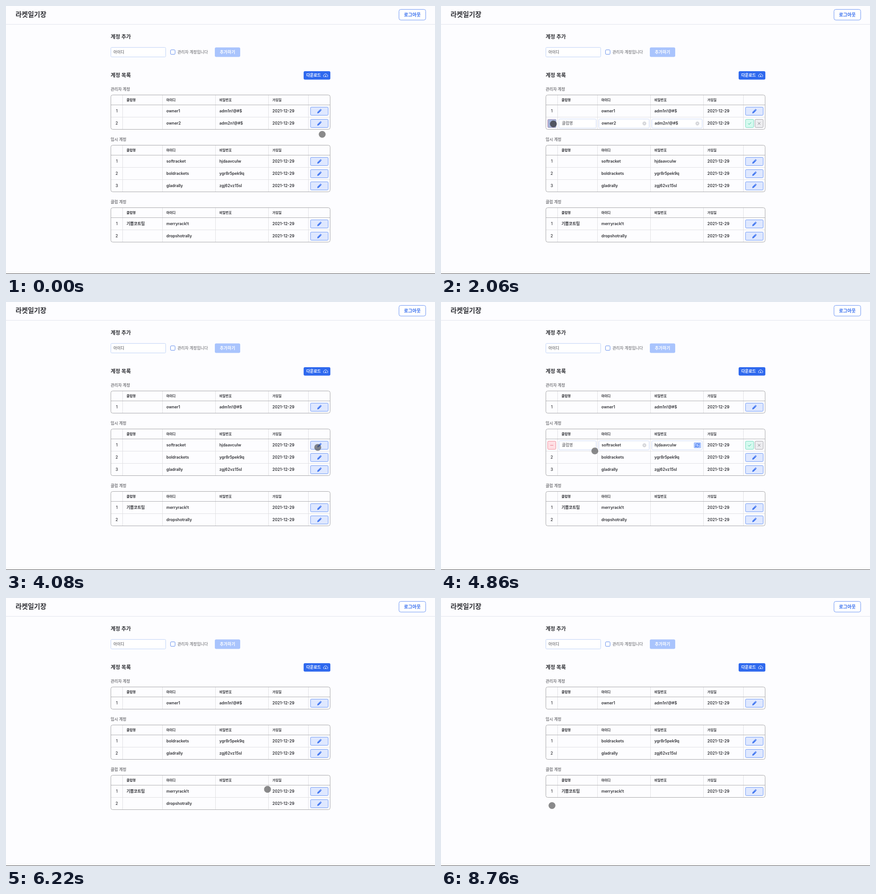
Write an HTML page that moves like this. It is 947 px wide and 592 px high and loops after 9.06 s.

```html
<!DOCTYPE html>
<html lang="ko">
<head>
<meta charset="utf-8">
<title>라켓일기장</title>
<style>
html, body { margin: 0; width: 100%; height: 100%; overflow: hidden; background: #fdfdff; }
svg { display: block; position: absolute; left: 0; top: 0; }
text { font-family: Inter, "Noto Sans CJK KR", "Noto Sans CJK", sans-serif; white-space: pre; }
</style>
</head>
<body>
<svg width="947" height="592" viewBox="0 0 947 592">
  <g id="page"></g>
  <g id="tables"></g>
  <rect id="flash" height="19" rx="2" fill="rgba(105,152,210,.6)"/>
  <circle id="cursor" r="7.6"/>
</svg>
<script>
const LOOP = 9060;
const BLUE = '#2f69ee', INK = '#303136', LINE = '#e0e0e3';
const $ = id => document.getElementById(id);

// y is the vertical middle of the line
const text = (s, x, y, size, weight = 600, fill = INK, anchor = 'start') =>
  `<text x="${x}" y="${y + size * 0.364}" font-size="${size}" font-weight="${weight}" fill="${fill}" text-anchor="${anchor}">${s}</text>`;
const cell = (s, x, y) => text(s, x, y, 8.75);
const box = (x, y, w, h, r, fill, stroke = fill) =>
  `<rect x="${x + .5}" y="${y + .5}" width="${w - 1}" height="${h - 1}" rx="${r}" fill="${fill}" stroke="${stroke}"/>`;
const fillRect = (x, y, w, h, fill) =>
  `<rect x="${x}" y="${y}" width="${w}" height="${h}" fill="${fill}"/>`;
const path = (d, x, y, stroke, width = 1, fill = 'none') =>
  `<path transform="translate(${x} ${y})" d="${d}" fill="${fill}" stroke="${stroke}" stroke-width="${width}" stroke-linecap="round" stroke-linejoin="round"/>`;
const cross = (x, y, r, stroke) =>
  path(`M${-r} ${-r}L${r} ${r}M${r} ${-r}L${-r} ${r}`, x, y, stroke, .9);

const pencil = (x, y) =>
  path('M-4.4 4.4-3.8 1.5 1.2-3.5 3.5-1.2-1.5 3.8ZM2-4.3 2.7-4.8 4.8-2.7 4.3-2Z', x, y, BLUE, .4, BLUE) +
  path('M-2.4 1.8 1.6-2.2', x, y, '#dfe8ff', .6);

const clearMark = (x, y) =>
  `<circle cx="${x}" cy="${y}" r="4.2" fill="#d3d4d8"/>` + cross(x, y, 1.4, '#fff');

const refresh = (x, y) =>
  box(x - 8, y - 6.5, 16, 13, 1, '#a9c4fd') +
  path('M-4-.8A4.1 4.1 0 0 1 3.4-2M4.2-4V-1.4H1.8M4 .8A4.1 4.1 0 0 1-3.4 2M-4.2 4V1.4H-1.8', x, y, BLUE);

function drawPage() {
  $('page').innerHTML =
    text('라켓일기장', 21, 19, 14.8, 700) +
    fillRect(0, 40, 947, 1, '#e2e4ec') +
    box(867, 7, 60, 24.5, 4, '#fff', '#6b94f4') +
    text('로그아웃', 897, 19.3, 10, 700, BLUE, 'middle') +
    text('계정 추가', 231, 68, 11.4, 700) +
    box(231, 91, 122, 22, 2, '#fff', '#bfd2f7') +
    text('아이디', 237, 102, 8.7, 500, '#45464b') +
    box(362.7, 96.3, 11, 11, 2, '#fff', '#5b88ec') +
    text('관리자 계정입니다', 378.5, 102, 8.8, 400, '#5a5b60') +
    box(461, 91.5, 56, 21, 2, '#a9c4fd') +
    text('추가하기', 489, 102, 9.2, 700, '#fff', 'middle') +
    text('계정 목록', 231, 152.5, 11.4, 700) +
    box(657, 144, 59, 18.6, 2, BLUE) +
    text('다운로드', 663, 153.3, 8.7, 700, '#fff') +
    path('M-2.5 3.2H-3A2.2 2.2 0 0 1-3.3-1.1 3.4 3.4 0 0 1 3.2-1.3 2.3 2.3 0 0 1 3 3.2H2.5M0-.4V3.2M-1.5 1.8 0 3.3 1.5 1.8', 705.5, 153.3, '#fff', .9) +
    fillRect(0, 591, 947, 1, '#4a4a4c');
}

// rows: club, id, password
const GROUPS = [
  ['관리자 계정', [['', 'owner1', 'adm1n!@#$'], ['', 'owner2', 'adm2n!@#$']]],
  ['임시 계정', [['', 'softracket', 'hjdaavculw'], ['', 'boldrackets', 'ygr8r5pek9q'], ['', 'gladrally', 'zgj62vz15sl']]],
  ['클럽 계정', [['기쁨코트팀', 'merryrack!t', ''], ['', 'dropshotrally', '']]]
];
const HEADS = ['클럽명', '아이디', '비밀번호', '가입일'];
const COLS = [257, 345, 462, 579, 667];
const ROW = 27;

const plainRow = (row, n, y) =>
  text(n, 244.5, y, 8.75, 500, INK, 'middle') +
  row.map((s, i) => cell(s, COLS[i] + 9, y)).join('') +
  box(671.7, y - 9.3, 40, 19, 2, '#dfe8ff', '#6b95f5') + pencil(691.8, y + .2);

function editRow([, id, pass], y, canRenew) {
  const input = i => box(COLS[i] + 3, y - 10, COLS[i + 1] - COLS[i] - 5, 21, 2, '#fff', '#cbd8f5');
  const field = (s, i, mark) => input(i) + cell(s, COLS[i] + 9.5, y) + mark(COLS[i + 1] - 13, y + .3);
  const button = (x, fill, stroke) => box(x, y - 9.3, 19, 19, 2, fill, stroke);
  return button(235, '#ffdfe4', '#f08c9b') + path('M-3 0H3', 244.5, y + .3, '#ea7486') +
    input(0) + text('클럽명', 267, y, 8.7, 500, '#45464b') +
    field(id, 1, clearMark) +
    (pass ? field(pass, 2, canRenew ? refresh : clearMark) : '') +
    button(671.7, '#d5faef', '#74d9bd') + path('M-3 .2-1 2.2 3-2', 681.2, y + .3, '#35bd97') +
    button(692.7, '#ededf0', '#a3a3a8') + cross(702.2, y + .3, 2.5, '#77777c');
}

function drawTables(removed, editing) {
  let top = 196, s = '';
  GROUPS.forEach(([title, all], g) => {
    const rows = all.filter(r => !removed.includes(r[1]));
    const h = 23 + rows.length * ROW;
    s += text(title, 231, top - 12.5, 8.8, 500, '#404146');
    COLS.forEach(x => s += fillRect(x, top + 1, 1, h - 2, LINE));
    rows.forEach((row, i) => {
      const y = top + 36.2 + i * ROW;
      if (i) s += fillRect(232, top + 22 + i * ROW, 483, 1, LINE);
      s += row[1] === editing ? editRow(row, y, g === 1) : plainRow(row, i + 1, y);
      s += cell('2021-12-29', COLS[3] + 9, y);
    });
    s += fillRect(232, top + 22, 483, 1, '#b0b0b3') + box(231, top, 485, h, 4, 'none', '#a6a6a9');
    HEADS.forEach((label, i) => s += text(label, COLS[i] + 9, top + 11.5, 7.4, 700));
    top += h + 34;
  });
  $('tables').innerHTML = s;
}

const HOLD = 60, SWEEP = 640;
const slow = u => u * u * (3 - 2 * u);
const out = u => 1 - (1 - u) ** 3;
const overshoot = u => 1 + 4.4 * (u - 1) ** 3 + 3.4 * (u - 1) ** 2;

// Each round: reach the pencil, tap it, sweep to the minus button, tap it, drift off.
const ROUNDS = [
  { id: 'owner2', y: 259, reach: [120, 940], ease: slow, edit: 1060, sag: 12, stop: [248, 260.5], drop: 2040, leave: [2580, 3000], rest: [672, 392.5] },
  { id: 'softracket', y: 316, reach: [3320, 4200], ease: slow, edit: 4540, sag: 12, stop: [248, 317.5], drop: 5520, leave: [5900, 6020], rest: [575, 422] },
  { id: 'dropshotrally', y: 454, reach: [6220, 6540], ease: overshoot, edit: 6800, sag: 24, stop: [245, 458.5], drop: 7820 }
];
const MOVES = ROUNDS.flatMap(r => {
  const sweepAt = r.edit + HOLD;
  return [
    { span: r.reach, to: [689, r.y + 1.5], ease: r.ease, sag: 0 },
    { span: [sweepAt, sweepAt + SWEEP], to: r.stop, ease: out, sag: r.sag },
    ...(r.rest ? [{ span: r.leave, to: r.rest, ease: slow, sag: 0 }] : [])
  ];
});

function cursorAt(t) {
  let [x, y] = [698, 283.5];
  for (const { span: [from, to], to: goal, ease, sag } of MOVES) {
    if (t < from) break;
    const u = Math.min(1, (t - from) / (to - from)), k = ease(u);
    x += (goal[0] - x) * k;
    y += (goal[1] - y) * k + sag * Math.sin(Math.PI * u);
  }
  return [x, y];
}

let shown = '';
function render(t) {
  const gone = ROUNDS.filter(r => t >= r.drop + HOLD).map(r => r.id);
  const round = ROUNDS[gone.length];
  const editing = round && t >= round.edit + HOLD ? round.id : '';
  const key = gone + '/' + editing;
  if (key !== shown) drawTables(gone, editing);
  shown = key;

  const pressed = round && t >= (editing ? round.drop : round.edit);
  const flash = $('flash'), cursor = $('cursor');
  flash.style.display = pressed ? '' : 'none';
  if (pressed) {
    flash.setAttribute('x', editing ? 235.5 : 672);
    flash.setAttribute('y', round.y - 9);
    flash.setAttribute('width', editing ? 19 : 40);
  }
  const [x, y] = cursorAt(t);
  cursor.setAttribute('cx', x);
  cursor.setAttribute('cy', y);
  cursor.setAttribute('fill', pressed ? 'rgba(70,72,80,.88)' : 'rgba(72,72,72,.63)');
}

drawPage();
const start = performance.now();
function frame() {
  render((performance.now() - start) % LOOP);
  requestAnimationFrame(frame);
}
frame();
</script>
</body>
</html>
```
